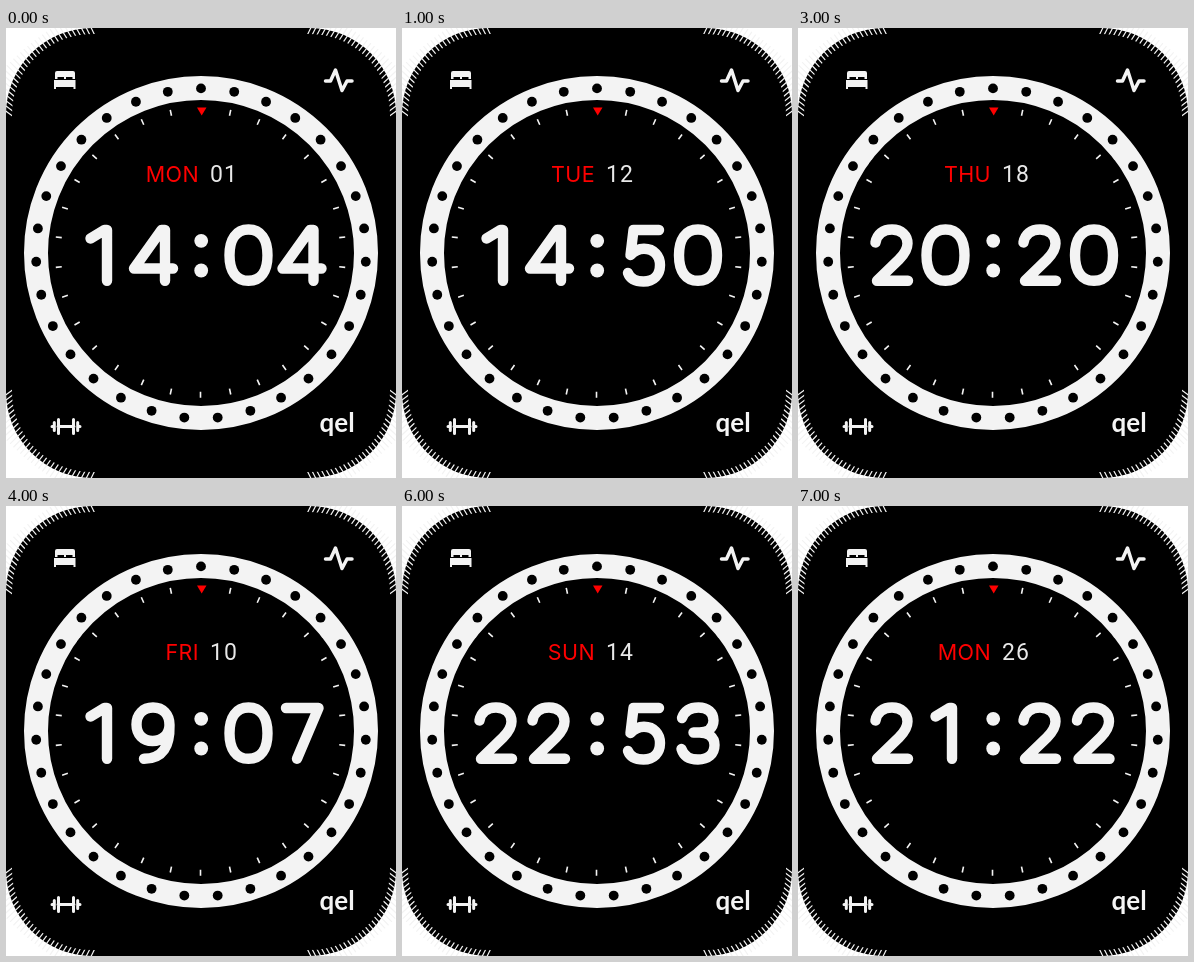
Write an HTML page that moves like this. It is 390 px wide and 450 px high and loops after 8 s.

```html
<!DOCTYPE html>
<html lang="en">
<head>
<meta charset="utf-8">
<title>Watch face</title>
<style>
  html, body { margin: 0; width: 100%; height: 100%; overflow: hidden; background: #fff; }
  svg { display: block; width: 390px; height: 450px; }
  text { font: 400 21.5px Inter, "Open Sans", sans-serif; }
  #day { fill: #f00; text-anchor: end; letter-spacing: .4px; }
  #date { font: 400 23px Roboto, sans-serif; letter-spacing: 1px; fill: #e8e8e8; }
  .label { font: 700 26px Lato, sans-serif; fill: #f4f4f4; }
  .line { fill: none; stroke: #f3f3f3; stroke-linecap: round; stroke-linejoin: round; }
  #digits { stroke-width: 10.4; }
  .ticks { fill: none; stroke: #f3f3f3; stroke-width: 1.6; }
</style>
</head>
<body>
<svg viewBox="0 0 390 450">
  <rect width="390" height="450" rx="86"/>
  <path id="edge" class="ticks" style="stroke-width:1.2"/>
  <rect x="6" y="6" width="378" height="438" rx="80"/>
  <circle cx="195" cy="225" r="165" fill="none" stroke="#f3f3f3" stroke-width="24"/>
  <g id="dots"></g>
  <path id="inner" class="ticks"/>
  <path d="M191 79.500H200.500L195.700 87.500Z" fill="#f00"/>

  <g id="bed" fill="#f3f3f3">
    <path d="M51 43H67Q69 43 69 45V51H66.500V49H60V51H58V49H51.500V51H49V45Q49 43 51 43Z"/>
    <path d="M48 52H69.500V61H67.500V59H50V61H48Z"/>
  </g>
  <path class="line" stroke-width="3.5" d="M319.500 53H324.500L329.500 42L336 62.500L341 53H346"/>
  <path class="line" stroke-width="3" d="M52 398.500H68M52.500 391.500V405.500M67.500 391.500V405.500M48.300 394.500V402.500M71.700 394.500V402.500M46 398.500H47M73 398.500H74"/>
  <text class="label" x="313.500" y="404">qel</text>

  <text id="day" x="193" y="154"></text>
  <text id="date" x="204" y="154"></text>
  <g id="digits" class="line"></g>
  <g fill="#f3f3f3">
    <circle cx="195.200" cy="212.800" r="6.900"/>
    <circle cx="195.200" cy="242.500" r="6.900"/>
  </g>
</svg>
<script>
const STEP = 1000;
const steps = [
  ['MON', '01', '1404'],
  ['TUE', '12', '1450'],
  ['WED', '13', '2254'],
  ['THU', '18', '2020'],
  ['FRI', '10', '1907'],
  ['SAT', '15', '0157'],
  ['SUN', '14', '2253'],
  ['MON', '26', '2122']
];

// Centre lines of the numerals, x measured from the left of each column
const glyphs = {
  0: 'M24.5 201.500C37 201.500 43.500 211.500 43.500 227.200S37 252.800 24.500 252.800 5.500 243 5.500 227.200 12 201.500 24.500 201.500Z',
  1: 'M14.500 210.500L28.500 202H31V252.800',
  2: 'M7.500 214.500C9 206 15 201.500 24 201.500C33.500 201.500 39.500 207.500 39.500 215.500C39.500 222 36 226.500 31 231.500L9 252.800H40',
  3: 'M8.500 212C11 205 17 201.500 25 201.500C34 201.500 40 206.500 40 214.500C40 222 34 226.500 26 226.500H20M26 226.500C35 226.500 41 231 41 239C41 248 34.500 253.500 24.500 253.500C15.500 253.500 10 249.500 8 243',
  4: 'M44 240.500H5L32.500 202H36V252.800',
  5: 'M39 202H13.500L10.500 227C14.500 222.500 19 220.700 24 220.700C34 220.700 40 228 40 237C40 247 33.500 253.500 23.500 253.500C15.500 253.500 10 250.500 8 245',
  7: 'M8.500 202H41L19.500 252.800',
  9: 'M40.500 219C40.500 208.500 34 201.500 24 201.500S7.500 208.500 7.500 218.500 14 235 23.500 235 40.500 228.500 40.500 219C41 240 34 252.800 15 252.800'
};
const columns = [70, 123, 218, 271.5];

const $ = id => document.getElementById(id);

function polar(cx, cy, r, deg) {
  const a = deg * Math.PI / 180;
  return [cx + r * Math.sin(a), cy - r * Math.cos(a)];
}

function tick(cx, cy, r1, r2, deg) {
  return `M${polar(cx, cy, r1, deg)}L${polar(cx, cy, r2, deg)}`;
}

// One dot per day of the month
$('dots').innerHTML = Array.from({ length: 31 }, (_, i) => {
  const [x, y] = polar(195, 225.4, 165, i * 360 / 31);
  return `<circle cx="${x}" cy="${y}" r="4.9"/>`;
}).join('');

let inner = '';
for (let i = 1; i < 30; i++) inner += tick(194.5, 224.2, 139.5, 145.5, i * 12);
$('inner').setAttribute('d', inner);

// Rays in the corners; the inset panel leaves only their tips
let edge = '';
for (let d = 26; d <= 54; d++) {
  for (const a of [d, 180 - d, 180 + d, 360 - d]) edge += tick(195, 225, 220, 270, a);
}
$('edge').setAttribute('d', edge);

function show([day, date, time]) {
  $('day').textContent = day;
  $('date').textContent = date;
  $('digits').innerHTML = [...time].map((n, i) =>
    `<path transform="translate(${columns[i]})" d="${glyphs[n]}"/>`).join('');
}

const start = performance.now();
let current = -1;

function frame() {
  const i = Math.floor((performance.now() - start) / STEP) % steps.length;
  if (i !== current) show(steps[current = i]);
  requestAnimationFrame(frame);
}
frame();
</script>
</body>
</html>
```
